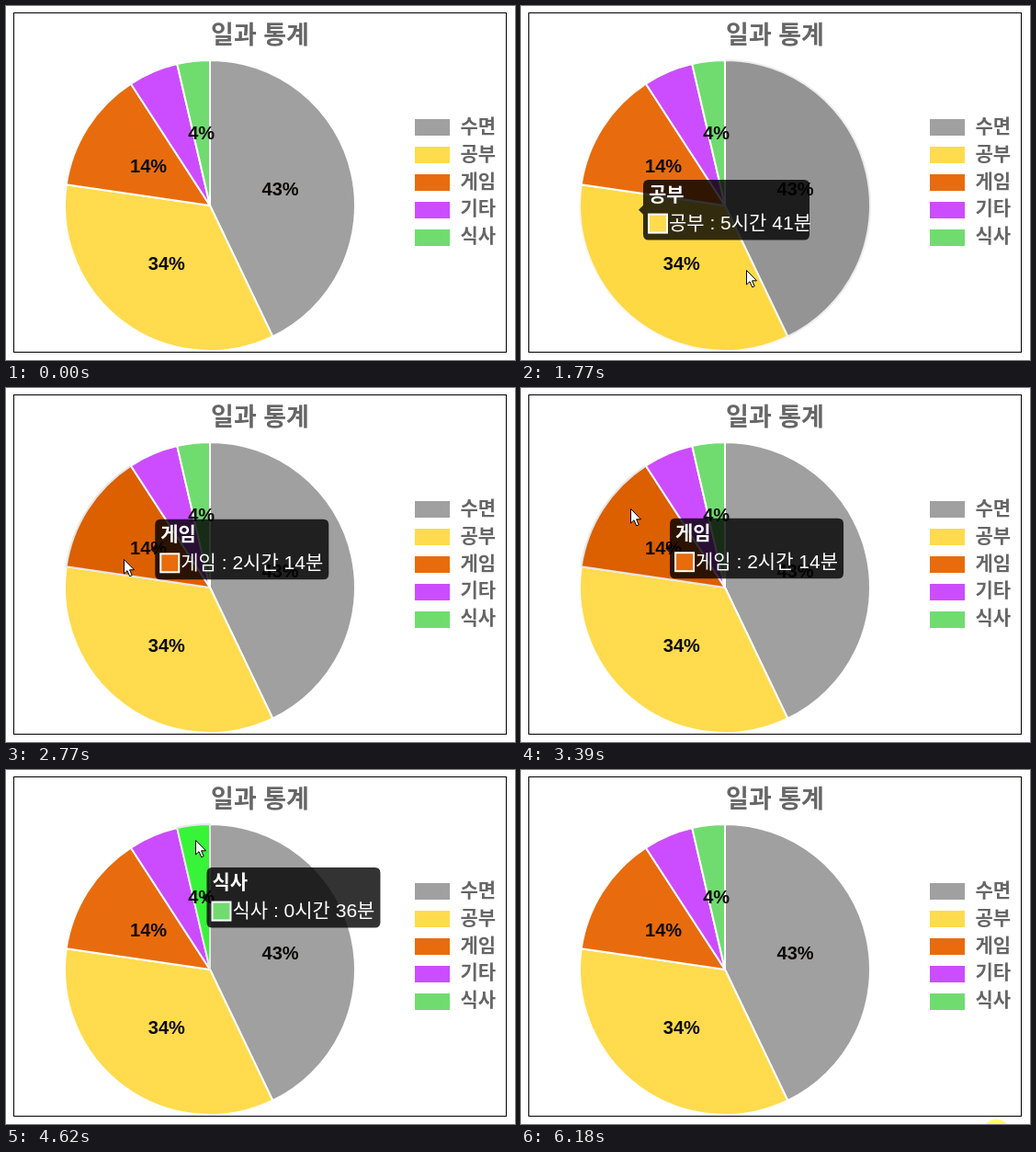
Write an HTML page that moves like this. It is 554 by 385 pixels and loops after 6260 ms.

```html
<!DOCTYPE html>
<html lang="ko">
<head>
<meta charset="utf-8">
<title>일과 통계</title>
<style>
html, body { margin: 0; width: 100%; height: 100%; overflow: hidden; background: #fff; }
svg { display: block; width: 554px; height: 385px; }
text { font-family: "Liberation Sans", "Noto Sans CJK KR", "Noto Sans CJK JP", "Noto Sans CJK", sans-serif; font-size: 21px; }
.bold { font-weight: 700; }
.grey { fill: #666; }
</style>
</head>
<body>
<svg id="stage" viewBox="0 0 554 385" xmlns="http://www.w3.org/2000/svg"></svg>
<script>
const LOOP = 6260, FADE = 400, CX = 222, CY = 217, R = 158, TIP_H = 65.5;
const stage = document.getElementById('stage');

function add(tag, attrs, parent = stage, text = '') {
  const el = document.createElementNS('http://www.w3.org/2000/svg', tag);
  set(el, attrs);
  el.textContent = text;
  parent.appendChild(el);
  return el;
}
function set(el, attrs) {
  for (const k in attrs) el.setAttribute(k, attrs[k]);
}
const mix = (a, b, p) => a.map((v, i) => v + (b[i] - v) * p);
const rgb = c => `rgb(${c.map(Math.round)})`;
const easeOut = p => 1 - (1 - Math.min(1, Math.max(0, p))) ** 4;

const slices = [
  { name: '수면', min: 425, base: [160, 160, 160], hover: [143, 143, 143] },
  { name: '공부', min: 341, base: [255, 219, 77], hover: [255, 212, 44] },
  { name: '게임', min: 134, base: [232, 108, 13], hover: [220, 95, 0] },
  { name: '기타', min: 55, base: [204, 77, 255], hover: [194, 44, 255] },
  { name: '식사', min: 36, base: [112, 220, 112], hover: [53, 245, 53] }
];
const total = slices.reduce((sum, s) => sum + s.min, 0);
const polar = (turn, r) => [CX + r * Math.sin(turn * 2 * Math.PI), CY - r * Math.cos(turn * 2 * Math.PI)];

add('rect', { width: 554, height: 385, fill: '#fff' });
add('rect', { x: 8.5, y: 7.5, width: 536, height: 369, fill: 'none', stroke: '#000' });
add('text', { x: 276.5, y: 40.5, 'text-anchor': 'middle', class: 'bold grey', style: 'font-size:27px' }, stage, '일과 통계');

let turn = 0;
slices.forEach((s, i) => {
  const end = turn + s.min / total;
  s.mid = polar((turn + end) / 2, R / 2);
  s.arc = add('path', {
    d: `M${polar(turn, R)}A${R} ${R} 0 0 1 ${polar(end, R)}L${CX} ${CY}Z`,
    'stroke-width': 2, 'stroke-linejoin': 'bevel'
  });
  turn = end;
  s.body = `${s.name} : ${Math.floor(s.min / 60)}시간 ${s.min % 60}분`;
  s.tipW = s.min % 60 < 10 ? 178 : 189;
  // the tooltip sits left of the first slice's centre, right of the others
  s.tipX = i ? s.mid[0] + 6.6 : s.mid[0] - 6.6 - s.tipW;
  s.tipY = s.mid[1] - TIP_H / 2;
  add('rect', { x: 445, y: 123 + 30 * i, width: 38, height: 18, fill: rgb(s.base) });
  add('text', { x: 494.5, y: 138 + 29.8 * i, class: 'bold grey' }, stage, s.name);
});
slices.forEach(s => {
  const pct = Math.round(s.min / total * 100);
  if (s.name !== '기타') {
    add('text', {
      x: s.mid[0] - .4, y: s.mid[1] + 6.3, 'text-anchor': 'middle',
      class: 'bold', style: 'font-size:20px', fill: '#0c0a08'
    }, stage, pct + '%');
  }
});

const tip = add('g', {});
const bubble = add('path', { fill: '#000', 'fill-opacity': .8 }, tip);
const tipTitle = add('text', { x: 6, y: 23, class: 'bold', fill: '#fff' }, tip);
add('rect', { x: 5, y: 36.5, width: 22, height: 22, fill: '#fff' }, tip);
const swatch = add('rect', { x: 7, y: 38.5, width: 18, height: 18 }, tip);
const tipBody = add('text', { x: 28, y: 54, fill: '#fff' }, tip);

const cursor = add('path', {
  d: 'M.5 .5V16L4 12.7 6.7 18.8 9.2 17.7 6.6 11.8H11.5Z', fill: '#fff', stroke: '#000'
});
const spot = add('circle', { cx: 517.5, cy: 395.7, r: 15.7, fill: '#ffff66' });

function bubblePath(w, left) {
  const h = TIP_H, r = 6, m = h / 2;
  const rightCaret = left ? '' : `V${m - 5}L${w + 5} ${m}L${w} ${m + 5}`;
  const leftCaret = left ? `V${m + 5}L-5 ${m}L0 ${m - 5}` : '';
  return `M${r} 0H${w - r}Q${w} 0 ${w} ${r}${rightCaret}V${h - r}Q${w} ${h} ${w - r} ${h}` +
    `H${r}Q0 ${h} 0 ${h - r}${leftCaret}V${r}Q0 0 ${r} 0Z`;
}

// [time, hovered slice]; -1 means the pointer left the pie
const hovers = [[860, 0], [1740, 1], [2500, 2], [3650, 3], [4410, 4], [5240, 0], [5450, -1]];

// [time, x, y]
const path = [
  [690, 352, 344], [850, 325, 305], [1010, 287, 260], [1500, 287, 260], [1740, 252, 284],
  [2000, 190, 310], [2233, 170, 312], [2500, 150, 208], [2850, 122, 180], [3100, 110, 152],
  [3387, 119, 131], [3540, 134, 108], [3650, 150, 106], [4080, 166, 101], [4300, 174, 96],
  [4410, 192, 86], [4600, 206, 76], [4850, 208, 72], [5110, 208, 72], [5240, 222, 70],
  [5317, 234, 68], [5395, 262, 48], [5460, 310, 24], [5550, 430, 90], [5650, 505, 220],
  [5780, 516, 359], [5866, 503, 364], [6020, 512, 385], [6100, 514, 400]
];

const runs = [[690, 1250, 7], [1540, 4850, 43], [5160, 6180, 13]];

function snap(t) {
  let q = 0;
  for (const [from, to, n] of runs) {
    if (t < from) break;
    const step = (to - from) / n;
    q = from + Math.min(n, Math.floor((t - from + 7) / step)) * step;
  }
  return q;
}

function pointer(t) {
  const i = path.findIndex(k => k[0] > t);
  if (i < 0) return path[path.length - 1].slice(1);
  if (!i) return [-50, -50];
  const a = path[i - 1], b = path[i];
  return mix(a, b, (t - a[0]) / (b[0] - a[0])).slice(1);
}

// state: tooltip x, y, width, opacity, then one highlight amount per slice
function hoverState(t) {
  const first = slices[0];
  let state = [first.tipX + 20, first.tipY + 23, first.tipW, 0, 0, 0, 0, 0, 0];
  let item = 0;
  hovers.forEach(([start, hit], i) => {
    if (t < start) return;
    if (hit >= 0) item = hit;
    const s = slices[item];
    const until = Math.min(t, i + 1 < hovers.length ? hovers[i + 1][0] : LOOP);
    const goal = [s.tipX, s.tipY, s.tipW, hit < 0 ? 0 : 1, ...slices.map((_, k) => k === hit ? 1 : 0)];
    state = mix(state, goal, easeOut((until - start) / FADE));
  });
  return { state, item };
}

function draw(time) {
  const t = snap(time);
  const { state, item } = hoverState(t);
  const [x, y, w, alpha, ...lit] = state;
  slices.forEach((s, i) => set(s.arc, {
    fill: rgb(mix(s.base, s.hover, lit[i])),
    stroke: rgb(mix([255, 255, 255], [230, 230, 230], lit[i]))
  }));
  set(tip, { transform: `translate(${x} ${y})`, opacity: alpha });
  set(bubble, { d: bubblePath(w, item > 0) });
  tipTitle.textContent = slices[item].name;
  tipBody.textContent = slices[item].body;
  set(swatch, { fill: rgb(slices[item].base) });
  set(cursor, { transform: `translate(${pointer(t).map(Math.round)})` });
  set(spot, { visibility: t >= 6179 ? 'visible' : 'hidden' });
}

const begin = performance.now();
function tick() {
  draw((performance.now() - begin) % LOOP);
  requestAnimationFrame(tick);
}
tick();
</script>
</body>
</html>
```
